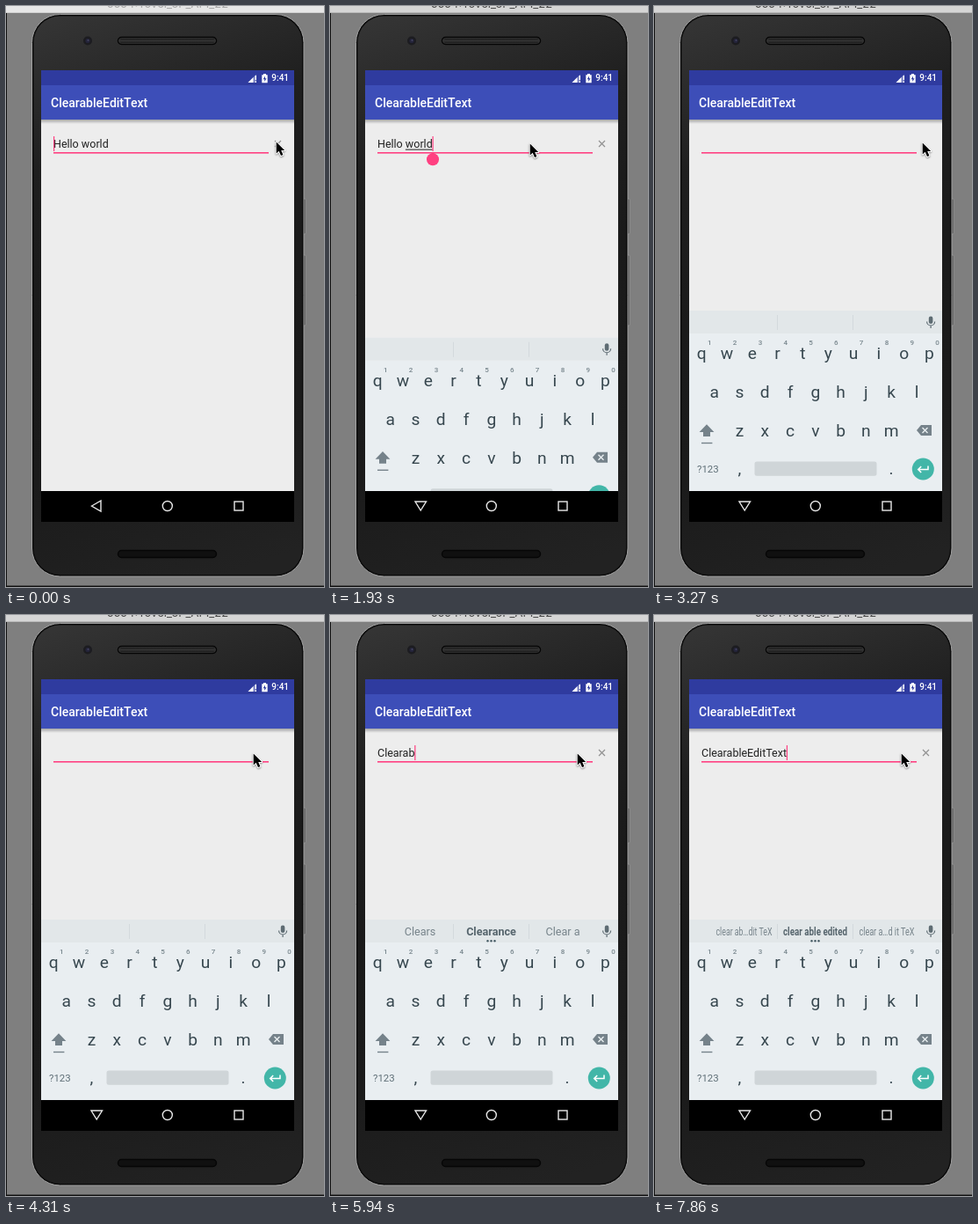
An HTML page with a canvas for the animation above (8000 ms loop, 362x660 px).

```html
<!DOCTYPE html>
<html lang="en">
<head>
<meta charset="utf-8">
<title>ClearableEditText</title>
<style>
html, body { margin: 0; width: 100%; height: 100%; overflow: hidden; background: #7f7f7f; }
canvas { display: block; width: 362px; height: 660px; }
</style>
</head>
<body>
<canvas id="stage"></canvas>
<script>
const W = 362, H = 660, LOOP = 8000;
const PINK = '#ff4081', KEY = '#37474f', ICON = '#75828a', PAPER = '#ededed';
const canvas = document.getElementById('stage');
const ctx = canvas.getContext('2d');
const dpr = window.devicePixelRatio || 1;
canvas.width = W * dpr;
canvas.height = H * dpr;

// Each track is a list of [start time, value]; values hold until the next one.
const pointer = [[0, [307, 154]], [1490, [227, 156]], [2230, [240, 157]], [2380, [285, 156]],
  [2530, [307, 154]], [3270, [305, 155]], [3420, [297, 158]], [3560, [286, 158]], [3710, [281, 157]]];
const field = [[0, 'Hello world'], [2820, ''], [4910, 'C'], [5060, 'Cl'], [5200, 'Cle'],
  [5350, 'Clea'], [5500, 'Clear'], [5790, 'Cleara'], [5940, 'Clearab'], [6090, 'Clearabl'],
  [6230, 'Clearable'], [6530, 'ClearableE'], [6670, 'ClearableEd'], [6810, 'ClearableEdi'],
  [6960, 'ClearableEdit'], [7410, 'ClearableEditT'], [7560, 'ClearableEditTe'],
  [7710, 'ClearableEditTex'], [7860, 'ClearableEditText']];
const caretOn = [[0, 1], [150, 0], [740, 1], [1190, 0], [1640, 1], [2230, 0], [2820, 1],
  [3270, 0], [3710, 1], [4310, 0], [4760, 1]];
const hints = [[0, ''], [2230, 'worldwide|world|world\'s'], [2970, ''], [4910, 'Can|C|Call'],
  [5060, 'Club|Cl|Class'], [5200, 'Clear|Cle|Clean'], [5350, 'Clear|Clean|Cleaning'],
  [5500, 'Clearly|Clear|Cleared'], [5790, 'Clears|Clear a|Clearance'],
  [5940, 'Clears|Clearance|Clear a'], [6090, 'Clearly|Clearable|Clear'],
  [6530, 'clears|clearable|clear'],
  [6670, 'clears|cleared|clearable'], [6810, 'clears bleed|clear a bleed|clearable'],
  [7110, 'clear edit|clearable edit|clearable'], [7410, 'clear ab…edit T|clear able edit|clear a…edit'],
  [7710, 'clear ab…it Tex|clear able edit|clear a…d it Te'],
  [7860, 'clear ab…dit TeX|clear able edited|clear a…d it TeX']];
const keyboardUp = [[0, 0], [1780, .35], [1930, .85], [2080, 1]];

function at(track, t) {
  let value = track[0][1];
  for (const [start, v] of track) if (t >= start) value = v;
  return value;
}

function rect(x, y, w, h, fill) {
  ctx.fillStyle = fill;
  ctx.fillRect(x, y, w, h);
}

function round(x, y, w, h, r, fill, stroke, line = 1) {
  ctx.beginPath();
  ctx.roundRect(x, y, w, h, r);
  if (fill) { ctx.fillStyle = fill; ctx.fill(); }
  if (stroke) { ctx.strokeStyle = stroke; ctx.lineWidth = line; ctx.stroke(); }
}

function disc(x, y, r, fill) {
  ctx.beginPath();
  ctx.arc(x, y, r, 0, Math.PI * 2);
  ctx.fillStyle = fill;
  ctx.fill();
}

function path(d, fill, stroke, line = 1) {
  const p = new Path2D(d);
  if (fill) { ctx.fillStyle = fill; ctx.fill(p); }
  if (stroke) { ctx.strokeStyle = stroke; ctx.lineWidth = line; ctx.stroke(p); }
}

function text(s, x, y, size, color, weight = 400, align = 'left', fit) {
  ctx.font = `${weight} ${size}px Roboto, sans-serif`;
  ctx.textAlign = align;
  ctx.fillStyle = color;
  ctx.fillText(s, x, y, fit);
}

function shade(x0, y0, x1, y1, ...colors) {
  const g = ctx.createLinearGradient(x0, y0, x1, y1);
  colors.forEach((c, i) => g.addColorStop(i / (colors.length - 1), c));
  return g;
}

function drawWindow(active) {
  rect(0, 0, W, H, '#7f7f7f');
  rect(0, 0, W, 8, active ? '#d5d5d5' : '#e6e6e6');
  rect(0, 7, W, 1, active ? '#b8b8b8' : '#d0d0d0');
  rect(0, 8, 1, H, '#111');
  rect(0, 658.5, W, 1.5, '#111');
  ctx.font = '13px Inter, sans-serif';
  ctx.textAlign = 'center';
  ctx.fillStyle = active ? '#4a4a4a' : '#a8a8a8';
  ctx.fillText('5554:Tovel_6P_API_22', 184, 2);
}

function drawPhone() {
  for (const [y, h] of [[219, 40], [283, 80]]) round(337.5, y, 3.5, h, 1, '#4a4a4a', '#a0a0a0', .7);
  round(29.5, 9.5, 309.5, 638.5, 32, '#0b0b0b', '#a2a2a2');
  round(31.5, 11.5, 305.5, 634.5, 30,
    shade(31, 11, 250, 646, '#363636', '#1f1f1f', '#1a1a1a', '#1b1b1b', '#222'));
  round(127.5, 35.5, 112, 8, 4, '#0a0a0a', '#050505', 1.5);
  round(128.5, 36.5, 110, 6, 3, shade(0, 36, 0, 43, '#111', '#333', '#111'), '#444', .6);
  round(127.5, 618.5, 112, 8, 4, '#101010', '#060606', 1.5);
  disc(93, 39.5, 5, '#1c1c20');
  disc(93, 39.5, 2.6, '#24243a');
  disc(93.5, 39, 1, '#454560');
}

function drawApp() {
  rect(40, 73, 288, 513, PAPER);
  rect(40, 129, 288, 5, shade(0, 129, 0, 134, 'rgba(0,0,0,.3)', 'rgba(0,0,0,0)'));
  rect(40, 90, 288, 39, '#3d4eb8');
  rect(40, 73, 288, 17, '#2f3b9f');
  text('ClearableEditText', 51, 115.2, 14, '#fff', 500);
  text('9:41', 322, 85.3, 10, '#fff', 500, 'right');
  path('M275.5 87 L285 77.5 V87 Z', 'rgba(255,255,255,.35)');
  path('M275.5 87 L281.5 81 V87 Z', '#fff');
  rect(283.6, 79, 1.4, 5, '#fff');
  rect(283.6, 85.4, 1.4, 1.6, '#fff');
  path('M293 77 h3 v1.2 h1.7 v9 h-6.4 v-9 H293 Z', '#fff');
  path('M295 79.5 L292.7 83.3 H294.3 V86 L296.5 82.3 H295 Z', '#2f3b9f');
}

function drawField(t) {
  const s = at(field, t);
  const tapped = t >= 1640 && t < 2820;
  rect(54, 166, 245, 1.6, PINK);
  text(s, 54, 161, 12.5, '#212121');
  const width = ctx.measureText(s).width;
  if (tapped && t >= 1930) {
    const from = ctx.measureText('Hello ').width;
    rect(54 + from, 162.6, width - from, 1, '#212121');
  }
  if (at(caretOn, t)) {
    const x = t < 1640 ? 54 : 53.8 + width;
    rect(x, 148, 1.2, 17, PINK);
  }
  if (tapped) {
    disc(117, 174.3, 7, PINK);
    path('M117 166.3 L112.2 170 H121.8 Z', PINK);
  }
  if (s) path('M306 153 l7 7 m0 -7 l-7 7', null, '#919191', 1.2);
}

function drawHints(t) {
  rect(40, 346, 288, 26, '#e2e7e9');
  for (const x of [140, 226]) rect(x, 351, 1, 17, '#d3d9dc');
  const words = at(hints, t);
  if (words) {
    const [left, mid, right] = words.split('|');
    text(left, 102.5, 364, 12.6, '#76838a', 400, 'center', 64);
    text(mid, 183.5, 364, 12.6, '#56656d', 700, 'center', 73);
    text(right, 265, 364, 12.6, '#76838a', 400, 'center', 63);
    for (const x of [179.5, 183.5, 187.5]) disc(x, 370.3, 1.2, '#455a64');
  }
  round(312.8, 352.5, 4.6, 8.5, 2.3, '#5e6c73');
  path('M310.6 358.5 a4.5 4.5 0 0 0 9 0 M315.1 363 v3', null, '#5e6c73', 1.2);
}

function drawKeys() {
  rect(40, 372, 288, 179, '#e9eef1');
  const rows = [['qwertyuiop', 54.2, 401], ['asdfghjkl', 68.6, 445], ['zxcvbnm', 97.4, 489]];
  for (const [keys, x, y] of rows)
    [...keys].forEach((k, i) => text(k, x + i * 28.8, y, 19.2, KEY, 400, 'center'));
  [...'1234567890'].forEach((k, i) => text(k, 63.3 + i * 28.8, 385, 8, '#78868d', 500, 'center'));

  path('M60 475.3 L68.4 484 H64 V489 H56 V484 H51.6 Z', ICON);
  rect(54, 495.8, 12.4, 1.4, ICON);
  path('M304 476 H316 V488 H304 L299 482 Z', ICON);
  path('M305.5 479 l6 6 m0 -6 l-6 6', null, '#e9eef1', 1.4);

  text('?123', 61.3, 530, 11.4, '#5f6f77', 400, 'center');
  text(',', 97.4, 532, 19.2, KEY, 400, 'center');
  text('.', 270, 532, 19.2, KEY, 400, 'center');
  round(114.5, 517.5, 139, 16.3, 2.5, '#cfd5d8');
  disc(306.3, 526, 12.5, '#42b6a8');
  path('M312 522.5 V526.5 H301 M304.2 523 L300.7 526.5 L304.2 530', null, '#fff', 1.5);
}

function drawKeyboard(t) {
  const up = at(keyboardUp, t);
  if (!up) return;
  ctx.save();
  ctx.beginPath();
  ctx.rect(40, 129, 288, 422);
  ctx.clip();
  ctx.translate(0, (1 - up) * 205);
  drawHints(t);
  drawKeys();
  ctx.restore();
}

function drawNav(t) {
  rect(40, 551, 288, 35, '#000');
  const back = t < 1930 ? 'M97.5 568 L108 562 V574 Z' : 'M97 563 H109.5 L103.2 573 Z';
  path(back, null, '#e8e8e8', 1.4);
  ctx.beginPath();
  ctx.arc(183.8, 568, 5.5, 0, Math.PI * 2);
  ctx.stroke();
  ctx.strokeRect(260, 563, 10, 10);
}

function drawPointer(t) {
  const [x, y] = at(pointer, t);
  ctx.save();
  ctx.translate(x, y);
  ctx.lineJoin = 'round';
  ctx.shadowColor = 'rgba(0,0,0,.35)';
  ctx.shadowBlur = 2 * dpr;
  ctx.shadowOffsetY = dpr;
  const arrow = 'M.7 .6 V13.6 L3.7 10.8 L6 16 L8.4 15 L6.2 9.9 H10.2 Z';
  path(arrow, '#fff', '#fff', 2);
  ctx.shadowColor = 'transparent';
  path(arrow, '#000');
  ctx.restore();
}

function draw(t) {
  ctx.setTransform(dpr, 0, 0, dpr, 0, 0);
  drawWindow(t >= 150);
  drawPhone();
  drawApp();
  drawField(t);
  drawKeyboard(t);
  drawNav(t);
  drawPointer(t);
}

const begin = performance.now();
function tick() {
  draw((performance.now() - begin) % LOOP);
  requestAnimationFrame(tick);
}
tick();
</script>
</body>
</html>
```
